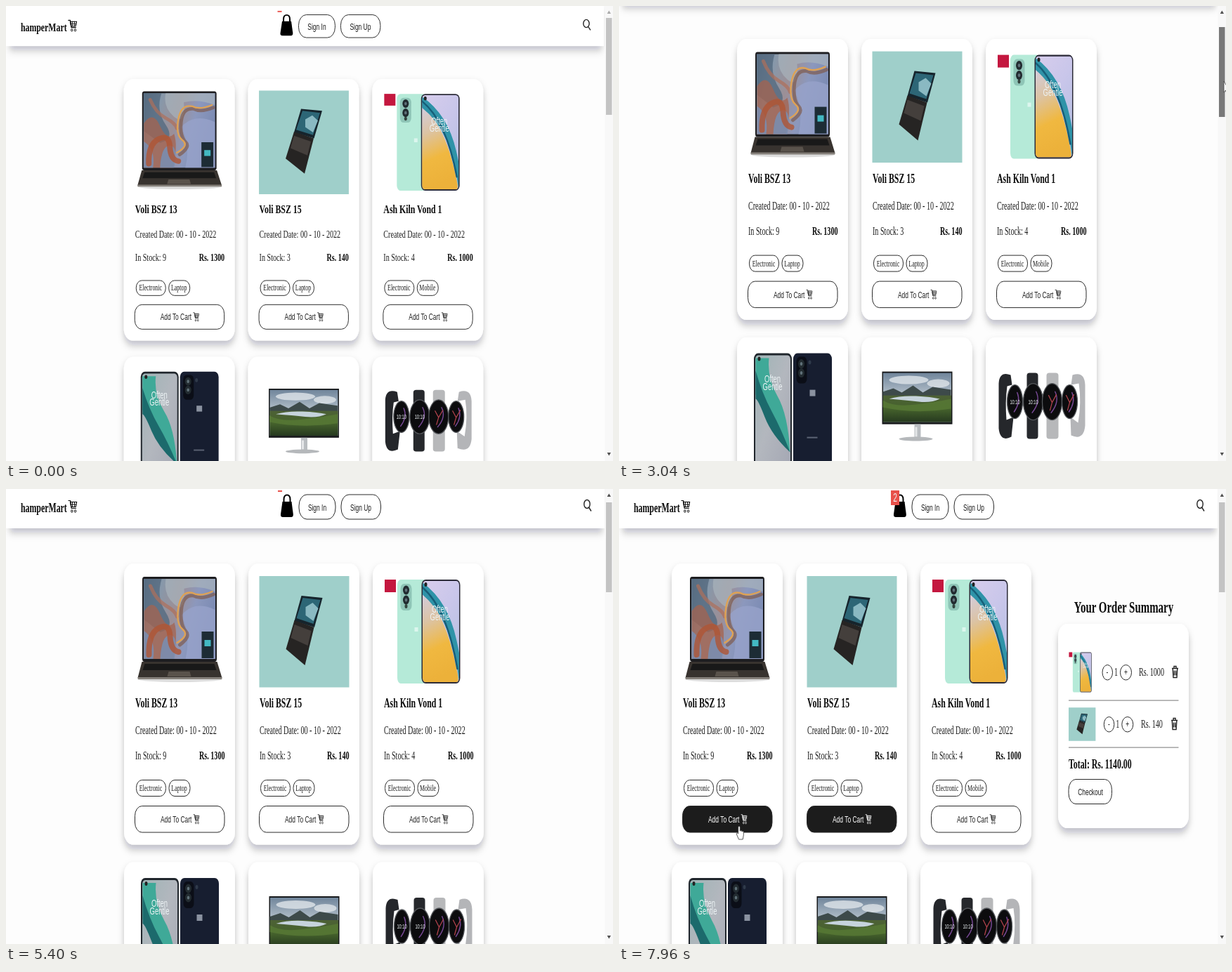
An HTML page that plays this animation: 864 by 648 pixels, repeating every 8000 ms.

```html
<!DOCTYPE html>
<html lang="en">
<head>
<meta charset="utf-8">
<title>Shop cart</title>
<style>
html, body { margin: 0; height: 100%; overflow: hidden; background: #fdfdfd; }
svg { display: block; width: 100vw; height: 100vh; }
text { font-family: "Liberation Serif", "Times New Roman", serif; fill: #1c1c1c; }
.ui { font-family: "Liberation Sans", Arial, sans-serif; }
.bold { font-weight: bold; fill: #0c0c0c; }
.mid { text-anchor: middle; }
.end { text-anchor: end; }
.slogan { fill: #eef4f6; }
.pill { fill: #fff; stroke: #2a2a2a; }
.line { fill: none; stroke: #222; stroke-width: 1.4; }
</style>
</head>
<body>
<svg id="stage" viewBox="0 0 864 648" preserveAspectRatio="none"></svg>
<script>
const SQUEEZE = 864 / 1365; // the page is shown narrower than it was laid out
const STEP = 5.4;           // page travel per pixel of scrollbar thumb
const LOOP = 8000;

const text = (x, y, s, size = 16, cls = '') =>
  `<text class="${cls}" font-size="${size}" transform="translate(${x} ${y}) scale(${SQUEEZE} 1)">${s}</text>`;
const rect = (x, y, w, h, fill, rx = 0, ry = rx) =>
  `<rect x="${x}" y="${y}" width="${w}" height="${h}" rx="${rx}" ry="${ry}" fill="${fill}"/>`;
const oval = (x, y, rx, ry, fill, more = '') =>
  `<ellipse cx="${x}" cy="${y}" rx="${rx}" ry="${ry}" fill="${fill}" ${more}/>`;
const path = (d, fill, more = '') => `<path d="${d}" fill="${fill}" ${more}/>`;
const stroke = (d, color, width, more = '') =>
  path(d, 'none', `stroke="${color}" stroke-width="${width}" stroke-linecap="round" ${more}`);
const pill = (x, y, w, h, rx, ry) =>
  `<rect class="pill" x="${x}" y="${y}" width="${w}" height="${h}" rx="${rx}" ry="${ry}"/>`;
const panel = (x, y, w, h, id = '') =>
  `<rect id="${id}" x="${x}" y="${y}" width="${w}" height="${h}" rx="13" ry="18" fill="#fff" filter="url(#shadow)"/>`;
const group = (id, body, more = '') => `<g id="${id}" ${more}>${body}</g>`;
const place = (href, x, y, sx = 1, sy = sx) =>
  `<use href="#${href}" transform="translate(${x} ${y}) scale(${sx} ${sy})"/>`;
const gradient = (id, dir, ...colors) =>
  `<linearGradient id="${id}" x1="0" y1="0" x2="${dir[0]}" y2="${dir[1]}">` +
  colors.map((c, i) => `<stop offset="${i / (colors.length - 1)}" stop-color="${c}"/>`).join('') +
  '</linearGradient>';

// Product pictures, each in a 128 by 159 box
const lens = (x, y) => oval(x, y, 4.5, 6.5, '#222b30') + oval(x, y, 1.8, 2.6, '#5f7078');
const slogan = (x, y) => text(x, y, 'Often', 15, 'ui mid slogan') + text(x, y + 11, 'Gentle', 15, 'ui mid slogan');

const laptop =
  oval(64, 147, 60, 4, '#ddd') +
  rect(10.5, 1, 106, 121, '#1d1d20', 3, 4) + rect(12.5, 4, 102, 114, 'url(#art)') +
  path('M13 4H38Q30 30 44 52T36 80L13 62Z', '#566b80', 'opacity=".8"') +
  path('M13 50Q26 30 36 54T56 66Q62 84 54 118H13Z', '#a5634f', 'opacity=".75"') +
  path('M13 78Q30 90 26 118H13ZM36 118Q38 84 50 84T56 118Z', '#7b8db0', 'opacity=".9"') +
  path('M44 4Q40 26 56 40T70 18Q90 12 114 22V4Z', '#a9b4bd', 'opacity=".7"') +
  path('M66 56Q84 34 114 48V118H72Q80 84 66 56Z', '#98a3cb', 'opacity=".8"') +
  stroke('M20 112Q19 82 34 74T50 86T62 108', '#b05535', 8, 'opacity=".8"') +
  stroke('M22 14Q30 34 44 42T60 58', '#b0705a', 5, 'opacity=".7"') +
  stroke('M112 26Q94 34 84 28Q68 26 66 48T72 78T64 98', '#7d5648', 5, 'opacity=".65"') +
  stroke('M110 22Q92 30 82 24Q66 20 62 44T68 76T60 95', '#dfa253', 2.4) +
  rect(95, 79, 17, 38, '#1d2c35') + rect(99, 91, 9, 9, '#43b8c2') +
  path('M10 122H117L124 145H4Z', '#38332f') +
  path('M14 125H113L116 134H11Z', '#191919') +
  path('M48 136H78L80 143H46Z', '#5a534c') + rect(4, 144, 120, 3, '#85807a', 1);

const foldable =
  rect(0, 0, 128, 158.5, '#9fcfca') +
  path('M60 28L90 31L78.5 73L50 64Z', '#16242c') +
  path('M62 31L87 34L77 68L53 60Z', '#2d6676') +
  path('M66 44L76 38L84 46L77 64L66 56Z', '#8ab9c2') +
  path('M50 63L78 73L65 127L38 104Z', '#262423') +
  path('M50 69L74 78L69 99L45 88Z', '#443f3c');

const mintPhone =
  rect(1.5, 5, 16, 18, '#c4173f') +
  rect(19.5, 5, 42, 148, '#b5ead8', 5, 8) + rect(24, 11, 16, 38, '#8fc5b7', 5, 7) +
  lens(32, 20) + lens(32, 34) + oval(32, 43, 2, 3, '#34443f') + rect(44, 73, 5, 6, '#dcf6ee') +
  rect(54, 5, 55, 148, '#2c2b38', 6, 8) +
  `<g clip-path="url(#glass)">` + rect(55.5, 7, 52, 144, 'url(#lilac)') +
  path('M55 24Q90 52 106 144V151H55Z', 'url(#amber)') +
  path('M55 9Q92 36 104 92T107 148Q98 62 55 26Z', '#2f93a8') +
  stroke('M55 16Q90 46 105 132', '#175e78', 2.5) + '</g>' +
  oval(60, 12, 2, 3, '#222') + slogan(80, 52);

const darkPhone =
  rect(8.5, 5, 54, 160, '#20262c', 6, 8) + rect(10.5, 8, 50, 155, 'url(#steel)', 4, 6) +
  path('M11 12H30Q27 40 42 66T60 146Q42 124 30 94T11 64Z', '#3fa998') +
  path('M11 30Q20 62 34 88T60 146Q34 122 24 96T11 70Z', '#1c6a6c') +
  oval(16, 13, 2, 3, '#222') + slogan(35, 46) +
  rect(64.5, 5, 55, 160, '#171e30', 6, 8) + rect(69, 10, 15, 38, '#0b0e17', 5, 7) +
  lens(76, 20) + lens(76, 33) + oval(88, 18, 2, 3, '#2f3a4a') +
  rect(88, 57, 8, 9, '#8a92a0') + rect(84, 124, 15, 2, '#5c6475');

const monitor =
  rect(14, 31, 100, 75, '#17191b') + rect(15.5, 33, 97, 70, 'url(#sky)') +
  oval(52, 43, 28, 6, '#dfe5ea', 'opacity=".8"') + oval(94, 48, 16, 6, '#e9edf0', 'opacity=".7"') +
  path('M15 60L30 55L42 61L58 51L72 61L86 53L112 57V72H15Z', '#3d4a4a') +
  rect(15.5, 65, 97, 38, 'url(#grass)') +
  path('M24 70Q40 65 62 66T96 70Q84 76 66 74T24 70Z', '#c6d3dc') +
  path('M15 72Q30 82 62 78T112 70V84Q60 92 15 82Z', '#587a35', 'opacity=".8"') +
  rect(60, 106, 9, 20, '#b9bdc1') + rect(61, 110, 3, 14, '#e4e6e8') + oval(62, 127, 24, 3, '#b5b8bb');

const face = (x, rx, ry) =>
  oval(x, 74, rx, ry, '#0c0c0e', 'stroke="#55585c" stroke-width="1.3"') +
  stroke(`M${x + rx * .3} ${74 - ry * .55}Q${x + rx * .8} 74 ${x - rx * .1} ${74 + ry * .6}`, '#7a4a98', 1.4);
const digits = x => text(x, 77, '10:10', 9, 'ui mid slogan');
const hands = x => stroke(`M${x - 5} 65L${x} 75L${x + 6} 64M${x} 75L${x - 3} 86`, '#b9454f', 1.2);
const watches =
  path('M22 50L20 36Q4 30 3 48V112Q5 132 21 124L24 96L14 100Q12 74 15 52Z', '#25272b') +
  rect(43, 33, 16, 94, '#26282c', 4) + rect(71, 33, 17, 94, '#b7b8ba', 4) +
  path('M106 50L108 36Q125 30 126 50V108Q124 130 106 122L105 96L116 104Q121 74 117 48Z', '#b4b5b8') +
  face(26, 11, 24) + face(52, 14, 26) + face(79, 14, 26) + face(104, 11, 24) +
  digits(26) + digits(52) + hands(79) + hands(104);

const pictures = { laptop, foldable, mintPhone, darkPhone, monitor, watches };

const cartIcon =
  stroke('M0 1H2.4L4.2 12H10.4', 'currentColor', 1.2) +
  path('M2.5 3H11.6L10.2 10H3.8Z', 'none', 'stroke="currentColor" stroke-width="1.1"') +
  stroke('M3 6.5H11M5.5 3V10M8.5 3V10', 'currentColor', .9) +
  oval(4.8, 16, 1.2, 1.7, 'none', 'stroke="currentColor"') +
  oval(9.6, 16, 1.2, 1.7, 'none', 'stroke="currentColor"');
const trash = '<path class="line" d="M0 3H9M3 3V0H6V3M1.2 3L2 16H7L7.8 3M3.4 6V13M5.6 6V13"/>';

const card = (x, y, picture) => panel(x, y, 158, 400) + place(picture, x + 15.5, y + 17.5);

const details = (x, name, stock, price, kind) =>
  text(x + 16, 311, name, 18.72, 'bold') +
  text(x + 16, 349, 'Created Date: 00 - 10 - 2022') +
  text(x + 16, 385, 'In Stock: ' + stock) +
  text(x + 143.5, 385, 'Rs. ' + price, 16, 'bold end') +
  pill(x + 17.5, 414.5, 42, 23, 8, 11) + text(x + 38, 430, 'Electronic', 12.5, 'mid') +
  pill(x + 64, 414.5, 30, 23, 8, 11) + text(x + 78.5, 430, kind, 12.5, 'mid') +
  `<g class="buy">${pill(x + 15.5, 451.5, 127.5, 37.5, 10, 14)}` +
  text(x + 52, 475, 'Add To Cart', 13.33, 'ui') +
  place('cartIcon', x + 99, 463, .68, .78) + '</g>';

const item = (y, picture, sy, price, dx) =>
  place(picture, 640, y - 30.5 * sy / .385, .3, sy) +
  pill(688 + dx, y - 10.5, 14.5, 21.5, 7.3, 10.8) + text(695 + dx, y + 4, '-', 13.33, 'ui mid') +
  text(707.5 + dx, y + 5, '1', 16, 'mid') +
  pill(713.5 + dx, y - 10.5, 16, 21.5, 8, 10.8) + text(721.5 + dx, y + 4, '+', 13.33, 'ui mid') +
  text(740 + dx * 1.3, y + 5, 'Rs. ' + price) +
  `<g transform="translate(${787 - dx * .4} ${y - 8.5})">${trash}</g>`;
const rule = y => rect(640, y, 156.5, 1.2, '#8c8c8c');

const header =
  `<g filter="url(#shadow)">${rect(5, -8, 844, 63, '#fff')}</g>` + rect(0, -8, 852, 64, '#fff') +
  text(21, 33, 'hamperMart', 18.72, 'bold') + place('cartIcon', 89, 15.5) +
  path('M393.5 18H406.5L408.800 36Q409 40 406 40H394Q390.500 40 391 36Z', '#000') +
  stroke('M395.500 22V15Q395.500 8.500 400 8.500T404.500 15V22', '#000', 2) +
  group('badge', '<rect x="387" y="2" width="6" height="2" fill="#e8504a"/>' + text(393, 18, '', 16, 'ui mid slogan')) +
  pill(417, 8, 52, 35, 11, 16) + text(443, 31, 'Sign In', 13.33, 'ui mid') +
  pill(477, 8, 56.5, 35, 11, 16) + text(505, 31, 'Sign Up', 13.33, 'ui mid') +
  '<path class="line" d="M829.500 26L833 31.500"/>' + oval(827, 21.5, 4.2, 6, 'none', 'class="line"');

const summary =
  text(718.5, 176, 'Your Order Summary', 23.6, 'bold mid') + panel(625, 192, 186, 224, 'box') +
  item(261, 'mintPhone', .385, 1000, 0) + rule(300.5) +
  group('second', item(335, 'foldable', .3, 140, 2.3) + rule(367.5)) +
  group('foot', text(640, 331, '', 18.72, 'bold') +
    pill(640, 346.5, 61.5, 35, 10, 15) + text(671, 369, 'Checkout', 13.33, 'ui mid'));

const defs =
  `<filter id="shadow" x="-20%" y="-50%" width="140%" height="200%">
    <feDropShadow dx="0" dy="7" stdDeviation="4.5 6" flood-color="#10101c" flood-opacity=".25"/></filter>
  <clipPath id="glass"><rect x="55.5" y="7" width="52" height="144" rx="4" ry="6"/></clipPath>` +
  gradient('art', [1, .3], '#5d7389', '#8798aa', '#9c8f96', '#8c98bd', '#7d8cb4') +
  gradient('lilac', [.6, 1], '#d7cdec', '#c9c6ea', '#b6bfe2') +
  gradient('amber', [.2, 1], '#d2cde0', '#dcc3a4', '#f0b840', '#ecb13a') +
  gradient('steel', [1, 1], '#9fb4b6', '#b3b7be', '#a5a8b4') +
  gradient('sky', [0, 1], '#70859b', '#bcc7d0', '#aebac2') +
  gradient('grass', [0, 1], '#4d6136', '#45622c', '#26391f') +
  Object.entries(pictures).map(([id, body]) => group(id, body)).join('') + group('cartIcon', cartIcon);

const stage = document.getElementById('stage');
stage.innerHTML = `<defs>${defs}</defs>` + rect(0, 0, 864, 648, '#fdfdfd') +
  group('page',
    group('cards',
      Object.keys(pictures)
        .map((p, i) => card(168 + i % 3 * 177, i < 3 ? 106.5 : 531.5, p)).join('') +
      details(168, 'Voli BSZ 13', 9, 1300, 'Laptop') +
      details(345, 'Voli BSZ 15', 3, 140, 'Laptop') +
      details(522, 'Ash Kiln Vond 1', 4, 1000, 'Mobile')) +
    group('summary', summary) + header) +
  rect(852.5, 0, 11.5, 648, '#f8f8f8') +
  '<rect id="thumb" x="854" width="8.500"/>' +
  path('M858.300 6.500L861 11H855.600Z', '#999', 'id="up"') + path('M855.600 636H861L858.300 640.500Z', '#505050') +
  path('M0 0V16L2.400 13L4.200 18.500L5.600 17.500L4 12.200H7Z', '#fff', 'id="arrow" stroke="#444" stroke-width=".8"') +
  path('M0 0Q-1.300 0 -1.300 2V11L-3 9.500Q-4 10 -3.500 12L-.5 19H5.200L6.300 13V8Q5.500 6 4.800 8Q4 5.500 3.200 7.500Q2.500 5 1.300 7V2Q1.300 0 0 0Z',
    '#fff', 'id="hand" stroke="#333" stroke-width=".8"');

const $ = id => document.getElementById(id);
const set = (el, attrs) => { for (const k in attrs) el.setAttribute(k, attrs[k]); };
const show = (el, on) => { el.style.display = on ? '' : 'none'; };

// Linear interpolation through [time, value] pairs
function at(keys, t) {
  const i = keys.findIndex(k => k[0] > t);
  if (i < 0) return keys[keys.length - 1][1];
  if (i === 0) return keys[0][1];
  const [t0, a] = keys[i - 1], [t1, b] = keys[i];
  return a + (b - a) * (t - t0) / (t1 - t0);
}

const drag = [[2070, 0], [2150, 3], [2410, 3], [2520, 10], [2670, 14], [2950, 14],
  [3040, 12], [3290, 12], [3670, 2], [3760, 1]];
const hover = [
  [[7600, 0], [7860, 1]],
  [[6480, 0], [6720, 1]],
  [[1260, 0], [1320, .1], [1500, .1], [1680, 0], [5560, 0], [5720, 1], [6460, 1], [6800, 0]]
];
const mouseX = [[6120, 520], [6450, 397], [6650, 340], [7300, 300], [7860, 171]];
const mouseY = [[6120, 474], [6450, 447], [6650, 474], [7300, 478], [7860, 480]];
const buttons = [...document.querySelectorAll('.buy')];
const ADD1 = 5660, ADD2 = 6800;

function draw(t) {
  const zoom = at([[50, 0], [350, 1]], t), ease = zoom * zoom * (3 - 2 * zoom);
  const notch = Math.round(at(drag, t));
  const count = t < ADD1 ? 0 : t < ADD2 ? 1 : 2;
  const extra = count > 1 ? 67 : 0;
  const dragging = t >= 2070 && t < 3770;

  set($('page'), { transform: `scale(${.9988 + .0012 * ease} ${.931 + .069 * ease}) translate(0 ${STEP * (1 - notch)})` });
  set($('thumb'), { y: 17 + ease + notch, height: 138 - 10 * ease, fill: dragging ? '#787878' : '#c3c3c3' });
  set($('up'), { fill: notch ? '#505050' : '#aaa' });

  set($('cards'), { transform: `translate(${count ? -93 : 0} 0)` });
  show($('summary'), count);
  show($('second'), count > 1);
  set($('box'), { height: 224 + extra });
  set($('foot'), { transform: `translate(0 ${extra})` });
  $('foot').firstChild.textContent = `Total: Rs. ${count > 1 ? 1140 : 1000}.00`;

  const [tab, number] = $('badge').children;
  set(tab, count ? { width: 12, height: 21 } : { width: 6, height: 2 });
  number.textContent = count || '';

  buttons.forEach((b, i) => {
    const v = at(hover[i], t), bg = 255 - 227 * v, ink = v > .4 ? '#fff' : '#222';
    b.children[0].style.fill = `rgb(${bg},${bg},${bg})`;
    b.children[1].style.fill = b.style.color = ink;
  });

  const pointing = t >= 6560;
  const held = t >= 2070 && t < 3640;
  const x = held ? 861 : at(mouseX, t), y = held ? 95 + notch : at(mouseY, t);
  show($('arrow'), held || t >= 6120 && !pointing);
  show($('hand'), pointing);
  set($(pointing ? 'hand' : 'arrow'), { transform: `translate(${x} ${y})` });
}

const start = performance.now();
(function tick() {
  draw((performance.now() - start) % LOOP);
  requestAnimationFrame(tick);
})();
</script>
</body>
</html>
```
